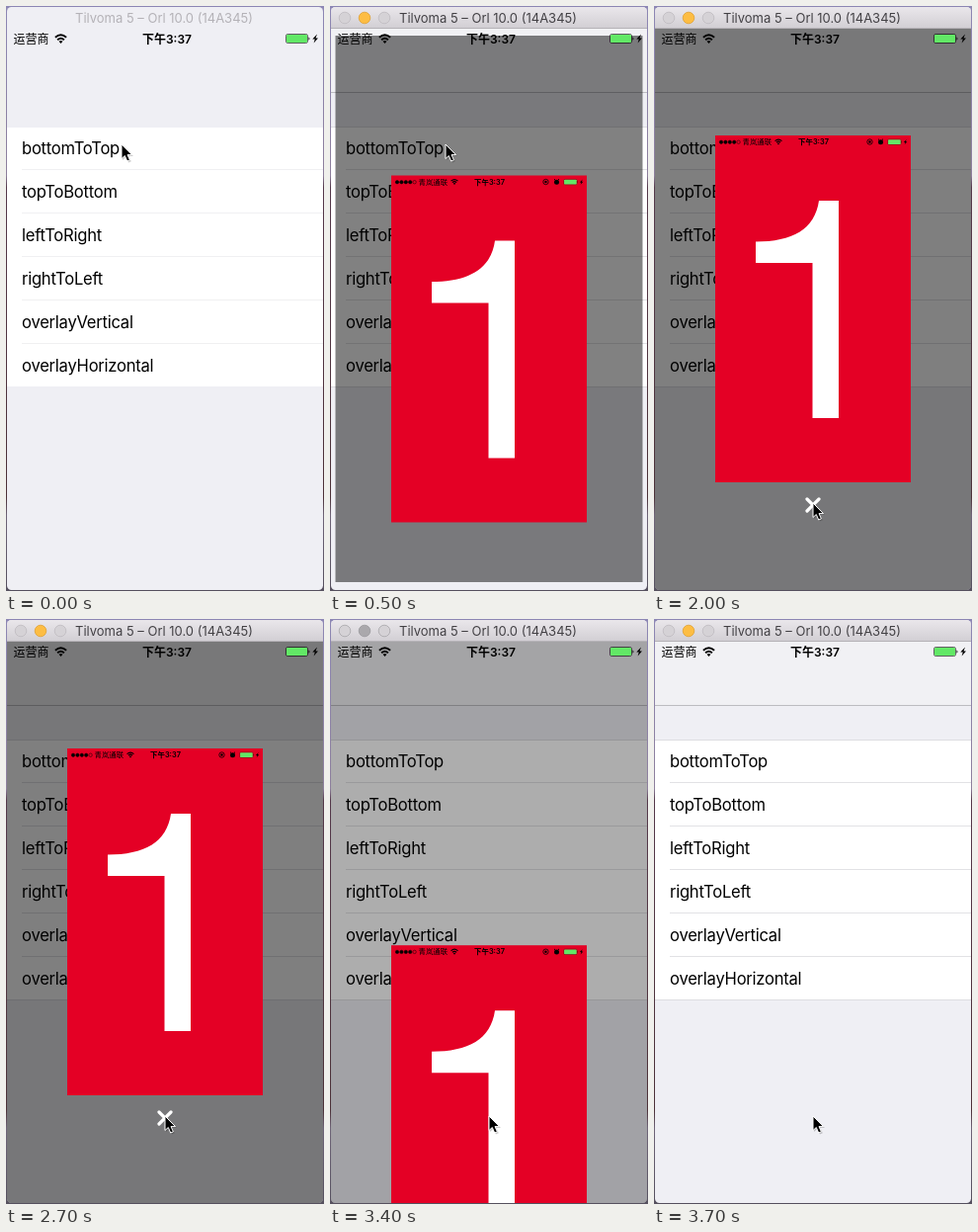
An HTML page that plays this animation: 322x592 px, repeating every 4 s.

```html
<!DOCTYPE html>
<html lang="zh-CN">
<head>
<meta charset="utf-8">
<title>Popup transition</title>
<style>
  html, body { margin: 0; width: 100%; height: 100%; overflow: hidden; background: #6d6478; }
  svg { display: block; width: 322px; height: 592px; }
  text { font-family: Inter, "Noto Sans CJK SC", "Noto Sans CJK", sans-serif; }
  .row { font-size: 16.6px; letter-spacing: -.25px; }
  .title { font-size: 13px; text-anchor: middle; }
  .status { font-size: 12px; font-weight: 500; }
  .mid { text-anchor: middle; }
  .wifi { fill: none; stroke: #000; stroke-width: 1.9; }
</style>
</head>
<body>
<svg viewBox="0 0 322 592">
  <defs>
    <linearGradient id="bar" x2="0" y2="1">
      <stop stop-color="#ebe8ec"/><stop offset="1" stop-color="#d2cfd4"/>
    </linearGradient>
    <linearGradient id="desk" x2="0" y2="1">
      <stop stop-color="#8c86b4"/><stop offset=".29" stop-color="#8d7f9c"/>
      <stop offset=".31" stop-color="#54384a"/><stop offset=".84" stop-color="#4c3138"/>
      <stop offset=".87" stop-color="#6e6478"/><stop offset="1" stop-color="#55505e"/>
    </linearGradient>
    <clipPath id="frame"><rect x="1" y="1" width="320" height="590" rx="4.5"/></clipPath>
    <g id="wifi">
      <path class="wifi" d="M-5.6-2.2Q0-7.4 5.6-2.2M-3.4.3Q0-2.8 3.4.3"/>
      <path d="M-2 1.8Q0 .2 2 1.8L0 4Z"/>
    </g>
    <g id="battery">
      <rect x=".5" y=".5" width="22" height="9" rx="1.8" fill="none" stroke="#000" stroke-opacity=".6"/>
      <rect x="1" y="1" width="21" height="8" rx="1" fill="#62e866"/>
      <path d="M23.5 3.2Q25.4 5 23.5 6.8Z"/>
      <path d="M32 .6L27.3 5.5H29.8L28.6 9.6L33 4.4H30.5Z"/>
    </g>
  </defs>

  <rect width="322" height="592" fill="url(#desk)"/>
  <g clip-path="url(#frame)">
    <rect width="322" height="592" fill="#efeff4"/>
    <rect y="123" width="322" height="262" fill="#fff"/>
    <g id="nav">
      <rect y="22" width="322" height="65" fill="#f1f1f4"/>
      <path d="M0 87.5H322" stroke="#bcbcc0"/>
      <path d="M0 122.5H322M0 385.5H322" stroke="#dddde1"/>
    </g>
    <path id="rules" stroke="#e2e2e5"/>
    <g id="rows"></g>
    <rect id="dim" x="1" y="22" width="320" height="569"/>

    <g id="titlebar">
      <rect width="322" height="22" fill="url(#bar)"/>
      <path d="M0 22.5H322" stroke="#b5b2b7"/>
      <g id="buttons" fill="#d5d2d6" stroke-width=".8">
        <circle cx="15" cy="12" r="5.8"/>
        <circle id="minimise" cx="35" cy="12" r="5.8"/>
        <circle cx="55" cy="12" r="5.8"/>
      </g>
    </g>
    <text id="title" class="title" x="160" y="17">Tilvoma 5 – Orl 10.0 (14A345)</text>

    <g class="status">
      <text x="7.5" y="37.5">运营商</text>
      <use href="#wifi" x="55.5" y="34"/>
      <text class="mid" x="163" y="37.5" font-weight="600">下午3:37</text>
      <use href="#battery" x="283" y="28"/>
    </g>

    <g id="card">
      <rect width="198" height="351" fill="#e40025"/>
      <path d="M125 66V286H98.5V129H41V107.5C78 107.5 101 95 105 66Z" fill="#fff"/>
      <g id="dots"></g>
      <g font-size="7.4" font-weight="500">
        <text x="27.5" y="9.3">青岚通联</text>
        <use href="#wifi" transform="translate(64 7) scale(.62)"/>
        <text class="mid" x="99.5" y="9.3" font-weight="600">下午3:37</text>
      </g>
      <circle cx="156.5" cy="6.5" r="2.7" fill="none" stroke="#000" stroke-width=".8"/>
      <circle cx="156.5" cy="6.5" r="1.2"/>
      <circle cx="167.5" cy="6.7" r="2.5"/>
      <path d="M165 4.6L166 3.7M170 4.6L169 3.7" stroke="#000"/>
      <use href="#battery" transform="translate(174.5 3.6) scale(.6)"/>
    </g>

    <path id="close" d="M155 499L167 511M167 499L155 511" stroke="#fff" stroke-width="3.2" stroke-linecap="round"/>
    <g id="cursor">
      <path d="M1 1.5V16L4.4 12.9L7 18.5L9.8 17.2L7.3 11.9H12Z" opacity=".2"/>
      <path d="M0 0V14.5L3.3 11.5L5.7 17L8.4 15.8L6 10.6H10.5Z" stroke="#fff" stroke-width="1" stroke-linejoin="round"/>
    </g>
  </g>
</svg>
<script>
  const LOOP = 4000, STEP = 100;
  const REST_Y = 131, BELOW_Y = 592;
  const labels = ['bottomToTop', 'topToBottom', 'leftToRight', 'rightToLeft', 'overlayVertical', 'overlayHorizontal'];
  // [time, x, y]
  const cursorPath = [[0, 117, 140], [600, 117, 140], [800, 146, 262], [1000, 172, 375],
                      [1200, 174, 436], [1400, 166, 482], [1700, 161, 503], [LOOP, 161, 503]];

  const $ = id => document.getElementById(id);
  const clamp = v => Math.min(1, Math.max(0, v));
  const span = (t, from, to) => clamp((t - from) / (to - from));
  const mix = (a, b, p) => a + (b - a) * p;
  const easeOut = p => 1 - (1 - p) ** 3;
  const easeInOut = p => p * p * (3 - 2 * p);

  $('rows').innerHTML = labels.map((label, i) =>
    `<text class="row" x="16" y="${149.8 + i * 44}">${label}</text>`).join('');
  $('rules').setAttribute('d', labels.slice(1).map((_, i) => `M16 ${165.5 + i * 44}H322`).join(''));

  $('dots').innerHTML = [0, 1, 2, 3, 4].map(i =>
    `<circle cx="${6 + i * 4.4}" cy="6.7" r="1.7" stroke="#000" stroke-width=".5" fill="${i < 4 ? '#000' : 'none'}"/>`
  ).join('');

  function cursorAt(t) {
    const i = cursorPath.findIndex(k => k[0] > t);
    const [t0, x0, y0] = cursorPath[i - 1], [t1, x1, y1] = cursorPath[i];
    const p = span(t, t0, t1);
    return [mix(x0, x1, p), mix(y0, y1, p)];
  }

  const show = (id, on) => $(id).setAttribute('visibility', on ? 'visible' : 'hidden');

  function draw(t) {
    const enter = easeOut(span(t, 250, 700));
    const leave = easeInOut(span(t, 3250, 3580));
    const fade = easeInOut(span(t, 3250, 3620));
    const active = t >= 100;
    const grey = t >= 3300 && t < 3700;

    const y = leave > 0 ? mix(REST_Y, BELOW_Y, leave) : mix(BELOW_Y, REST_Y, enter);
    $('card').setAttribute('transform', `translate(62 ${y.toFixed(1)})`);

    const scale = mix(.68, 1, enter);
    $('dim').setAttribute('transform', `translate(161 306.5) scale(${scale}) translate(-161 -306.5)`);
    $('dim').setAttribute('opacity', .5 * Math.min(1, enter * 1.08) * (1 - fade));

    show('nav', active);
    show('titlebar', active);
    $('rules').setAttribute('opacity', active ? 1 : .5);
    $('title').setAttribute('fill', active ? '#434145' : '#b4b2b7');
    $('buttons').setAttribute('stroke', grey ? '#a9a7ab' : '#bfbcc0');
    $('minimise').setAttribute('fill', grey ? '#aaa8ac' : '#fdbd43');
    $('minimise').setAttribute('stroke', grey ? '#9a989c' : '#e0a135');

    show('close', t < 3200);
    $('close').setAttribute('opacity', span(t, 600, 800));
    $('cursor').setAttribute('transform', `translate(${cursorAt(t)})`);
  }

  const start = performance.now();
  function tick() {
    const t = (performance.now() - start) % LOOP;
    draw(Math.floor(t / STEP) * STEP);
    requestAnimationFrame(tick);
  }
  tick();
</script>
</body>
</html>
```
